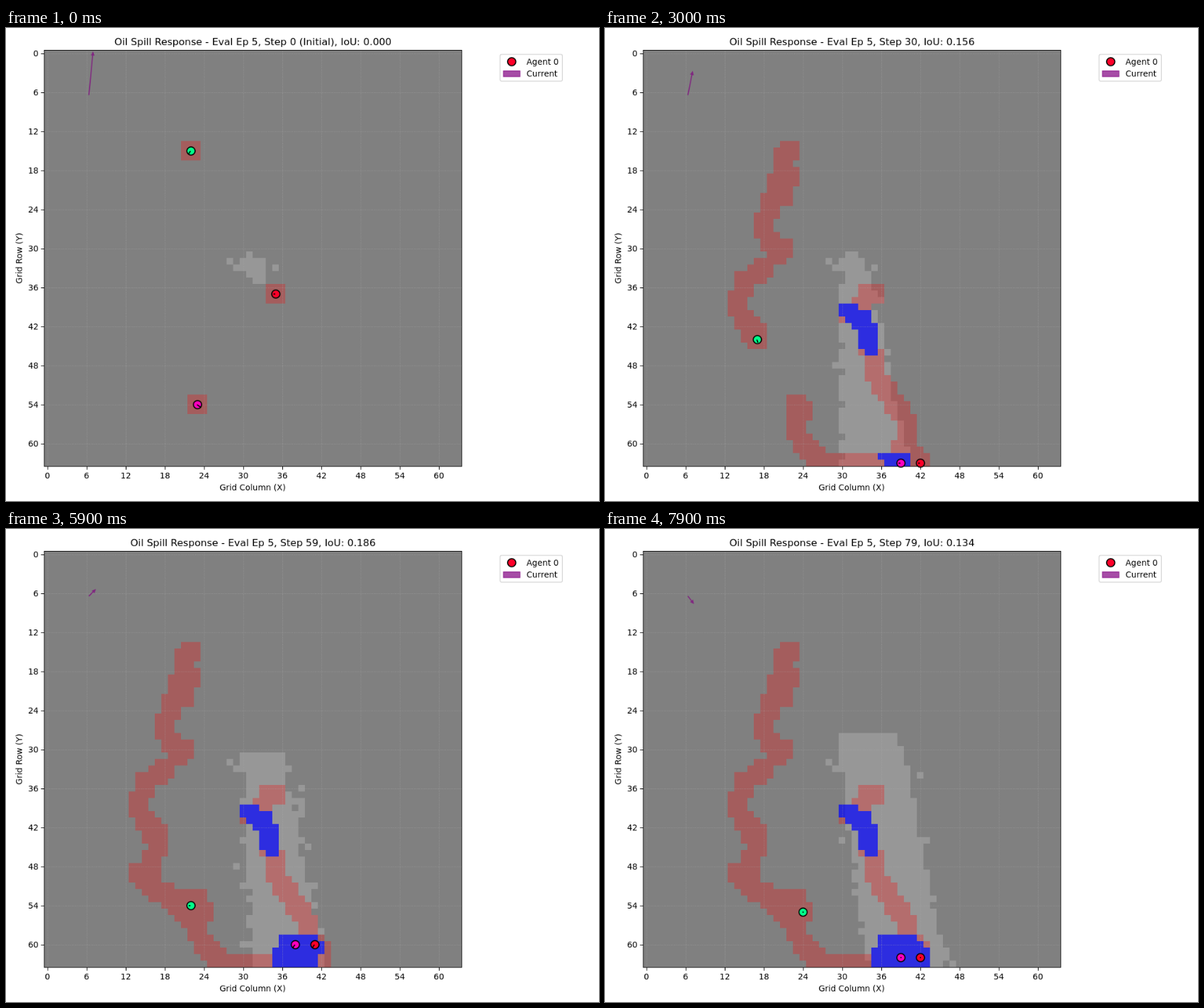
These frames come from a looping animation (837x669 px, 8 s). An HTML page with a canvas:

```html
<!DOCTYPE html>
<html lang="en">
<head>
<meta charset="utf-8">
<title>Oil Spill Response</title>
<style>
html, body { margin: 0; width: 100%; height: 100%; overflow: hidden; background: #fff; }
canvas { display: block; }
</style>
</head>
<body>
<canvas id="stage" width="837" height="669"></canvas>
<script>
// The chart is drawn on a 1000 x 800 board, then scaled down to the stage.
const stage = document.getElementById('stage').getContext('2d');
const board = document.createElement('canvas');
board.width = 1000;
board.height = 800;
const ctx = board.getContext('2d');
stage.imageSmoothingQuality = 'high';

const N = 64, CELL = 11, X0 = 64, Y0 = 37, SIZE = N * CELL;
const STEPS = 80, STEP_MS = 100;
const FONT = 13.89, TITLE_FONT = 16.67;
const PURPLE = 'rgba(128,0,128,0.7)';

// Waypoints: step, column, row. Two agents end up sweeping side by side.
const sweep = [[30,42,63], [33,39,63], [42,39,62], [46,42,61], [52,40,60], [57,41,60], [66,39,62], [79,42,62]];
const agents = [
  { color: '#ff0029', path: [[0,35,37], [1,34,37], [2,33,39], [3,31,40], [5,31,40], [6,33,41], [7,34,43],
    [9,34,45], [10,35,47], [11,35,49], [13,37,52], [16,40,57], [18,40,59], [19,39,61], [22,42,63], ...sweep] },
  { color: '#00ff8a', path: [[0,22,15], [1,21,16], [2,21,17], [3,22,19], [5,20,20], [7,21,22], [8,19,23],
    [13,19,23], [16,18,27], [17,19,29], [18,21,30], [21,17,34], [22,15,35], [25,14,39], [26,15,41],
    [30,17,44], [33,16,48], [34,14,49], [38,17,52], [42,20,53], [47,22,56], [50,23,53], [52,22,53],
    [66,21,55], [79,24,55]] },
  { color: '#ff00bf', path: [[0,23,54], [1,24,55], [2,23,57], [3,23,58], [4,24,60], [7,27,63], [13,32,63],
    ...sweep.map(([s, c, r]) => [s, c - 3, r])] }
];
const iou = [[0,0], [5,.25], [13,.231], [30,.156], [42,.17], [52,.194], [66,.178], [79,.134]];

// Linear interpolation between keys of the form [step, ...values].
function sample(keys, step) {
  const i = Math.max(1, keys.findIndex(k => k[0] >= step));
  const a = keys[i - 1], b = keys[i];
  const f = (step - a[0]) / (b[0] - a[0]);
  return a.slice(1).map((v, j) => v + (b[j + 1] - v) * f);
}

const place = (agent, step) => sample(agent.path, Math.min(step, STEPS - 1)).map(Math.round);

function noise(c, r) {
  const v = Math.sin(c * 12.9898 + r * 78.233) * 43758.5453;
  return v - Math.floor(v);
}

// The slick runs downwards, widens to the right and frays at its edges.
function isOil(c, r, step) {
  const u = step / (STEPS - 1);
  const top = 31 - 3.2 * u ** 4;
  const front = Math.max(35, 33.7 + 2.1 * step ** 0.8);
  if (r < top || r > front) return false;
  const taper = Math.max(0, 1 - (r - top), 1.5 - (front - r));
  const left = 30 + 4.2 * u ** 3 * (r - 31) / 30 + taper;
  const right = 32.8 + 6.4 * u ** 2.6 + 0.2 * (r - 31) - taper;
  const n = noise(c, r);
  const reach = 0.5 + (n - 0.5) * 1.2 + (n > 0.95 ? 1.5 : 0);
  return c >= left - reach && c <= right + reach;
}

// Each agent scans the 3 x 3 cells around it; a cell keeps its latest reading.
function scanned(step) {
  const cells = {};
  for (let s = 0; s <= step; s++) for (const a of agents) {
    const [x, y] = place(a, s);
    for (let r = y - 1; r <= Math.min(y + 1, N - 1); r++)
      for (let c = x - 1; c <= x + 1; c++) cells[r * N + c] = isOil(c, r, s) ? 'oil' : 'clear';
  }
  return cells;
}

function drawCells(step) {
  const cells = scanned(step);
  const tint = { oil: 'rgba(0,0,255,0.7)', clear: 'rgba(255,0,0,0.28)' };
  ctx.fillStyle = '#808080';
  ctx.fillRect(X0, Y0, SIZE, SIZE);
  for (let r = 0; r < N; r++) for (let c = 0; c < N; c++) {
    const fill = color => {
      ctx.fillStyle = color;
      ctx.fillRect(X0 + c * CELL, Y0 + r * CELL, CELL, CELL);
    };
    if (isOil(c, r, step)) fill('#979797');
    const reading = cells[r * N + c];
    if (reading) fill(tint[reading]);
  }
}

function text(str, x, y, size = FONT, align = 'center') {
  ctx.font = `${size}px "DejaVu Sans", sans-serif`;
  ctx.textAlign = align;
  ctx.fillStyle = '#000';
  ctx.fillText(str, x, y);
}

function line(x1, y1, x2, y2) {
  ctx.beginPath();
  ctx.moveTo(x1, y1);
  ctx.lineTo(x2, y2);
  ctx.stroke();
}

function disc(x, y, color) {
  ctx.beginPath();
  ctx.arc(x, y, 6.94, 0, 7);
  ctx.fillStyle = color;
  ctx.fill();
  ctx.strokeStyle = '#000';
  ctx.lineWidth = 1.8;
  ctx.stroke();
}

function drawAxes() {
  const right = X0 + SIZE, bottom = Y0 + SIZE;
  ctx.lineWidth = 1;
  for (let n = 0; n <= 60; n += 6) {
    const x = X0 + n * CELL + 6.5, y = Y0 + n * CELL + 6.5;
    ctx.strokeStyle = 'rgba(176,176,176,0.5)';
    ctx.setLineDash([1.1, 1.83]);
    line(x, bottom, x, Y0);
    line(X0, y, right, y);
    ctx.setLineDash([]);
    ctx.strokeStyle = '#000';
    line(x, bottom + 1, x, bottom + 6);
    line(X0 - 5, y, X0, y);
    text(n, x - 0.5, bottom + 20.5);
    text(n, X0 - 9.2, y + 4.8, FONT, 'right');
  }
  ctx.strokeRect(X0 + 0.5, Y0 + 0.5, SIZE, SIZE);
  text('Grid Column (X)', X0 + SIZE / 2, 781.5);
  ctx.save();
  ctx.translate(27, Y0 + SIZE / 2 + 0.5);
  ctx.rotate(-Math.PI / 2);
  text('Grid Row (Y)', 0, 0);
  ctx.restore();
}

function drawCurrent(step) {
  const dx = 7 + 0.036 * step, dy = 1.1 * step - 74;
  const len = Math.max(17, Math.hypot(dx, dy)), neck = len - 7;
  ctx.save();
  ctx.translate(139.8, 113.5);
  ctx.rotate(Math.atan2(dy, dx));
  ctx.fillStyle = PURPLE;
  ctx.beginPath();
  ctx.rect(0, -0.9, neck, 1.8);
  ctx.moveTo(neck, -3.2);
  ctx.lineTo(len, 0);
  ctx.lineTo(neck, 3.2);
  ctx.fill();
  ctx.restore();
}

function drawAgents(step) {
  for (const a of agents) {
    const [c, r] = place(a, step), [nextC, nextR] = place(a, step + 1);
    const x = X0 + (c + 0.5) * CELL + 0.5, y = Y0 + (r + 0.5) * CELL + 0.5;
    disc(x, y, a.color);
    line(x - 0.9, y, x + 0.9 + 5 * Math.sign(nextC - c), y + 5 * Math.sign(nextR - r));
  }
}

function drawLegend() {
  ctx.beginPath();
  ctx.roundRect(833.3, 44.5, 105, 45.5, 2.8);
  ctx.strokeStyle = '#d6d6d6';
  ctx.lineWidth = 1.39;
  ctx.stroke();
  disc(852.8, 57, agents[0].color);
  ctx.fillStyle = ctx.strokeStyle = PURPLE;
  ctx.lineWidth = 1.39;
  ctx.fillRect(838.9, 72.6, 27.8, 9.7);
  ctx.strokeRect(838.9, 72.6, 27.8, 9.7);
  text('Agent 0', 877.8, 61.8, FONT, 'left');
  text('Current', 877.8, 82.2, FONT, 'left');
}

function draw(now) {
  const step = Math.floor(now / STEP_MS) % STEPS;
  ctx.fillStyle = '#fff';
  ctx.fillRect(0, 0, board.width, board.height);
  drawCells(step);
  drawAxes();
  drawCurrent(step);
  drawAgents(step);
  drawLegend();
  const label = step || '0 (Initial)';
  const score = sample(iou, step)[0].toFixed(3);
  text(`Oil Spill Response - Eval Ep 5, Step ${label}, IoU: ${score}`, X0 + SIZE / 2 + 0.5, 29.2, TITLE_FONT);
  stage.drawImage(board, 0, 0, 837, 669);
}

let start;
function tick(now) {
  start ??= now;
  draw(now - start);
  requestAnimationFrame(tick);
}
draw(0);
requestAnimationFrame(tick);
</script>
</body>
</html>
```
